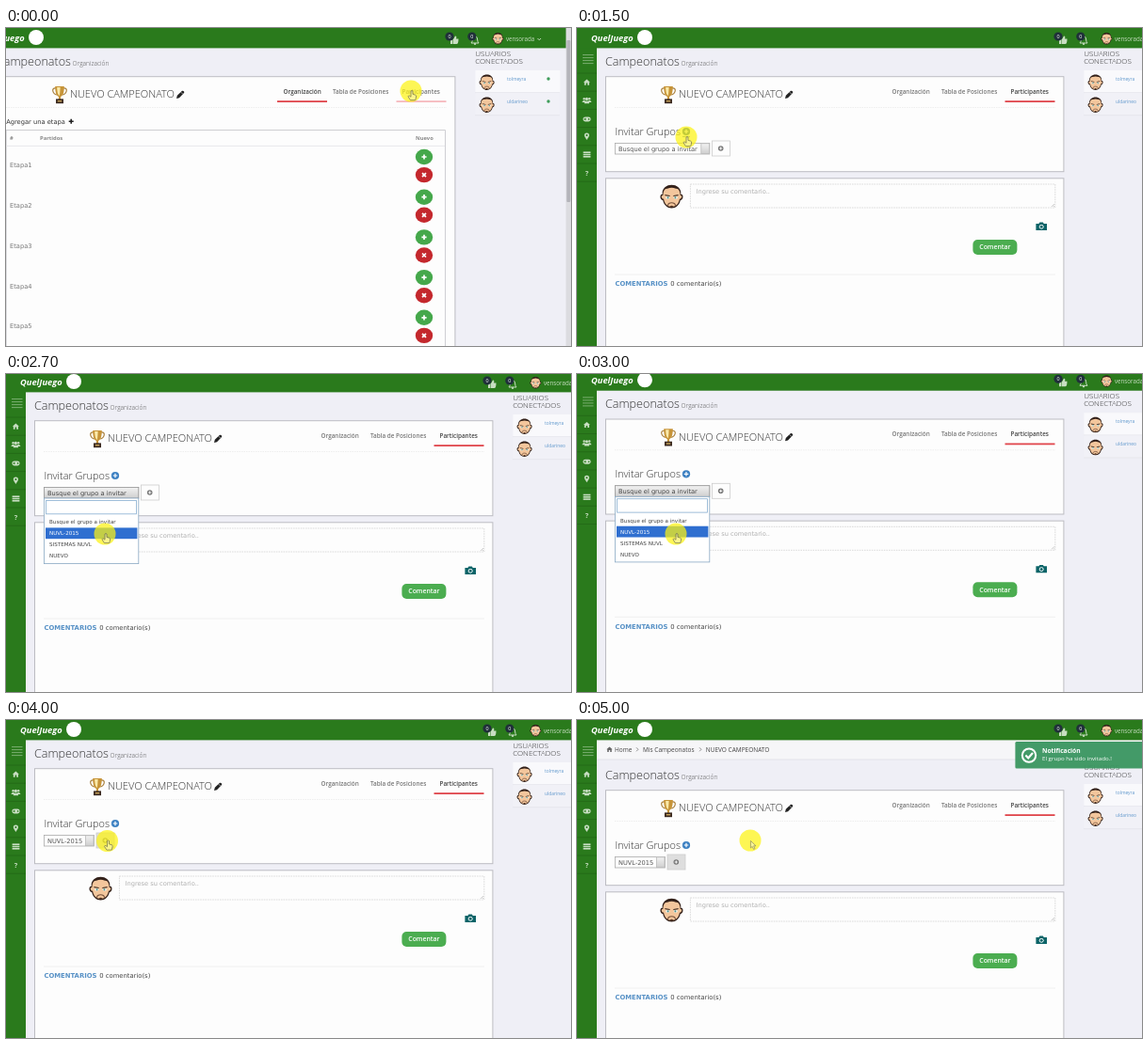
Write an HTML page that moves like this. It is 600x338 px and loops after 5100 ms.

```html
<!DOCTYPE html>
<html lang="es">
<head>
<meta charset="utf-8">
<title>Campeonatos</title>
<style>
html, body { margin: 0; width: 100%; height: 100%; overflow: hidden; background: #efeff6; }
svg { display: block; width: 100vw; height: 100vh; }
text { white-space: pre; }
.o { font-family: "Open Sans", sans-serif; }
.l { font-family: "Open Sans", sans-serif; font-weight: 300; }
.s { font-family: "Open Sans", sans-serif; font-weight: 600; }
.b { font-family: "Open Sans", sans-serif; font-weight: 700; }
.d { font-family: "DejaVu Sans", sans-serif; }
.db { font-family: "DejaVu Sans", sans-serif; font-weight: 700; }
</style>
</head>
<body>
<svg id="stage" viewBox="0 0 600 338" preserveAspectRatio="none"></svg>
<script>
const LOOP = 5100, STEP = 100;
const GREEN = '#2a7a1c', PALE = '#c8dec2';

// Markup helpers; text is placed by the vertical middle of its capitals.
const txt = (x, mid, size, cls, fill, s, extra = '') =>
  `<text x="${x}" y="${(mid + size * .36).toFixed(2)}" font-size="${size}" class="${cls}" fill="${fill}" ${extra}>${s}</text>`;
const rect = (x, y, w, h, fill, extra = '') =>
  `<rect x="${x}" y="${y}" width="${w}" height="${h}" fill="${fill}" ${extra}/>`;
const circle = (x, y, r, fill, extra = '') =>
  `<circle cx="${x}" cy="${y}" r="${r}" fill="${fill}" ${extra}/>`;
const oval = (x, y, rx, ry, fill) =>
  `<ellipse cx="${x}" cy="${y}" rx="${rx}" ry="${ry}" fill="${fill}"/>`;
const path = (d, fill, extra = '') => `<path d="${d}" fill="${fill}" ${extra}/>`;
const line = (d, color, w, extra = '') =>
  path(d, 'none', `stroke="${color}" stroke-width="${w}" ${extra}`);
const group = (id, body, extra = '') => `<g id="${id}" ${extra}>${body}</g>`;
const at = (x, y, body, k = 1) => `<g transform="translate(${x} ${y}) scale(${k})">${body}</g>`;
const border = c => `stroke="${c}" stroke-width=".8"`;
const panel = (y, h) => rect(30.5, y, 486.4, h, '#fdfdfd', 'stroke="#bcbcc2" stroke-width="1"');
const plus = (x, y, r, c, w) => line(`M${x - r} ${y}h${2 * r}M${x} ${y - r}v${2 * r}`, c, w);
const cross = (x, y, r, c, w) =>
  line(`M${x - r} ${y - r}l${2 * r} ${2 * r}M${x + r} ${y - r}l${-2 * r} ${2 * r}`, c, w);

// Face about 20 units wide
const face = (x, y, r) => at(x, y,
  path('M-8.6 -2C-9.6 -13.6 9.6 -13.6 8.6 -2C11.4 -2.6 11 3.4 8.2 3.6C7 8.4 4 11 0 11C-4 11 -7 8.4 -8.2 3.6C-11 3.4 -11.4 -2.6 -8.6 -2Z', '#33211a') +
  path('M-7.8 -3C-7.2 -6.4 -5.6 -7.4 -4 -7.2C-1.4 -8.4 1.4 -8.4 4 -7.2C5.6 -7.4 7.2 -6.4 7.8 -3L8 -.8C10.2 -1.4 9.6 2.4 7.4 2.4C6.4 7.6 3.6 9.6 0 9.6C-3.6 9.6 -6.4 7.6 -7.4 2.4C-9.6 2.4 -10.2 -1.4 -8 -.8Z', '#f3c69c') +
  path('M-6.4 -1.8L-1.6 -.9V.1L-6 -.7ZM6.4 -1.8L1.6 -.9V.1L6 -.7Z', '#3c2a20') +
  oval(-3.7, 1.2, 1.9, 1.1, '#f2f8f4') + oval(3.7, 1.2, 1.9, 1.1, '#f2f8f4') +
  circle(-3.4, 1.2, .9, '#4f8d84') + circle(3.4, 1.2, .9, '#4f8d84') +
  line('M-3.4 8.6C-4 5 4 5 3.4 8.6', '#75503a', 1) +
  path('M-1.6 9.8C-1.6 8 1.6 8 1.6 9.8Z', '#5a3a28'), r / 10.5);

const house = c => path('M0 -4L4.4 0H3.2V3.6H1V1H-1V3.6H-3.2V0H-4.4Z', c);
const person = (x, y, k) => at(x, y, circle(0, -2, 1.7, PALE) + path('M-3 3.4C-3 -.6 3 -.6 3 3.4Z', PALE), k);

const trophy = at(97, 71,
  line('M-4 -7C-9.6 -7.6 -7.4 -.6 -2.4 0M4 -7C9.6 -7.6 7.4 -.6 2.4 0', '#a9813f', 1.2) +
  path('M-4.8 -9H4.8C4.8 -2 3.4 1 1.1 2V5H-1.1V2C-3.4 1 -4.8 -2 -4.8 -9Z', '#c79438') +
  path('M-2.8 -8H.6C.4 -3 .2 -1 -.2 1C-2.2 0 -2.8 -4 -2.8 -8Z', '#fbe9a8') +
  rect(-4, 4.4, 8, 4.8, '#3b2a20') + rect(-2.2, 6, 4.4, 1.4, '#c9a45a'));

const pencil = at(225, 71, path('M-4 4L-3.2 .8L2 -4.2Q3 -4.6 4 -3.4Q4.6 -2.6 4 -2L-1 3.2Z', '#222') +
  line('M.8 -2.8L2.8 -.8', '#fff', .6));

const tab = (x, s, id) => txt(x, 67.5, 6.35, 's', '#777', s, id ? `id="${id}"` : '');

function row(i) {
  const y = 137 + i * 42.7;
  return txt(44, y + 9, 6.7, 'd', '#777', 'Etapa' + (i + 1)) +
    oval(484, y, 9.2, 8.2, '#45a84b') + plus(484, y, 2.6, '#fff', 1.7) +
    oval(484, y + 19.1, 9.2, 8.2, '#c4282d') + cross(484, y + 19.1, 2, '#fff', 1.7);
}

function addBox(x, id) {
  return rect(x, 120, 19, 16, '#fdfdfd', `id="${id}" ${border('#ccc')}`) +
    circle(x + 9.3, 128, 2.8, '#777') + plus(x + 9.3, 128, 1.6, '#fff', .9);
}

function select(w, s) {
  return rect(40.4, 122.4, w, 11.6, '#fdfdfd', border('#aaa')) +
    rect(40.4 + w - 9, 122.8, 8.6, 10.8, 'url(#grad)', border('#bbb')) +
    txt(44, 128.4, 6.65, 'd', '#555', s);
}

const groups = ['Busque el grupo a invitar', 'NUVL-2015', 'SISTEMAS NUVL', 'NUEVO'];
const menu = rect(40.4, 122.4, 100.4, 11.6, 'url(#grad)', border('#999')) +
  txt(44, 128.4, 6.65, 'd', '#444', groups[0]) +
  rect(40.4, 134, 100.4, 69.6, '#fff', border('#8aa9c4')) +
  rect(42.6, 136.4, 95.8, 14.4, '#fff', border('#86add0')) +
  rect(42, 0, 97.4, 11.8, '#2f6fd0', 'id="pick"') +
  groups.map((s, i) => txt(46, 159.2 + i * 12, 5.6, 'd', '#444', s, 'data-option')).join('');

const inviteTab =
  panel(51.7, 101) + panel(159.8, 260) +
  txt(40.4, 110, 10.9, 'l', '#333', 'Invitar Grupos') +
  circle(116, 110, 4.1, '#3c80c2', 'id="invite"') + plus(116, 110, 2.3, '#fff', 1.2) +
  line('M112 115.4H120', '#2a6496', .7, 'id="under"') +
  group('wide', select(100.4, groups[0]) + addBox(143.4, 'addWide')) +
  group('slim', select(53, groups[1]) + addBox(96, 'add')) +
  face(100.5, 179, 12) +
  rect(120.4, 166, 387.4, 25, '#fdfdfd', 'stroke="#ccc" stroke-width=".7" stroke-dasharray="1.6 1"') +
  line('M504 190L507 187M506 190L507 189', '#999', .5) +
  txt(126.5, 173.8, 6.65, 'd', '#b0b0b0', 'Ingrese su comentario..') +
  path('M487.4 208H490.4L491.4 206.6H494.8L495.8 208H499V215H487.4Z', '#0c6468') +
  circle(493.2, 211.3, 2.4, '#fff') + circle(493.2, 211.3, 1.5, '#0c6468') +
  rect(420.4, 225, 47, 16, '#4bad50', 'rx="5"') +
  txt(443.9, 233, 6.9, 's', '#fff', 'Comentar', 'text-anchor="middle"') +
  line('M40 262H508', '#ececec', .8) +
  txt(40.4, 271.8, 6.85, 'db', '#5791c6', 'COMENTARIOS') +
  txt(99.3, 271.8, 6.8, 'd', '#444', '0 comentario(s)');

const stagesTab =
  panel(51.7, 360) +
  txt(40.2, 99.3, 6.7, 'd', '#333', 'Agregar una etapa') + plus(109.2, 99.3, 2.5, '#222', 1.6) +
  rect(40.2, 108.6, 466.2, 300, '#fdfdfd', border('#c4c4c8')) +
  line('M40 125.4H506', '#e4e4e8', .8) +
  txt(44, 117.3, 5.8, 'b', '#888', '#') + txt(76, 117.3, 5.8, 'b', '#888', 'Partidos') +
  txt(475, 117.3, 5.8, 'b', '#888', 'Nuevo') +
  [0, 1, 2, 3, 4].map(row).join('');

const people = ['tolmeyra', 'uldarineo'].map((s, i) => {
  const y = 45 + i * 24;
  return rect(538.4, y, 90, 23.4, i ? '#f1f1f7' : '#f9f9fc') + line(`M538 ${y + 23.7}H628`, '#e2e2ea', .7) +
    face(550.6, y + 12.6, 8) + txt(572, y + 8.8, 4.9, 'o', '#5f97cc', s) + circle(616, y + 9, 1.7, '#3f9d5a');
}).join('');

const page =
  rect(0, -2, 640, 21, '#f6f6f8') + line('M21 19H640', '#dfdfe6', .8) +
  at(34.5, 8.3, house('#666'), .72) +
  txt(40, 8.3, 6.5, 'o', '#444', 'Home') + txt(70, 8.3, 6.5, 'o', '#444', 'Mis Campeonatos') +
  txt(136.8, 8.3, 6.5, 'o', '#444', 'NUEVO CAMPEONATO') +
  line('M63 6.3l2 2l-2 2M130 6.3l2 2l-2 2', '#777', .8) +
  txt(30, 35.2, 12.6, 'l', '#333', 'Campeonatos') + txt(110.6, 37.4, 6.6, 'l', '#555', 'Organización') +
  txt(538.2, 27, 8, 'l', '#333', 'USUARIOS') + txt(538.2, 35.2, 8, 'l', '#333', 'CONECTADOS') +
  people + group('invitePane', inviteTab) + group('stagesPane', stagesTab) +
  trophy + txt(108, 70.5, 11, 'l', '#333', 'NUEVO CAMPEONATO') + pencil +
  line('M40 84.5H508', '#e8e8e8', .7, 'stroke-dasharray="1.5 1"') +
  tab(334.5, 'Organización', 'tabOrg') + tab(387, 'Tabla de Posiciones') +
  tab(460.5, 'Participantes', 'tabPart') +
  rect(328, 77.2, 53, 1.8, '#e0464c', 'id="lineOrg"') + rect(454.5, 77.2, 53, 1.8, '#e0464c', 'id="linePart"') +
  group('menu', menu);

const badge = x => circle(x, 9, 4.6, '#20303a') + txt(x, 9, 5.4, 'o', '#fff', '0', 'text-anchor="middle"');
const header =
  rect(0, -6, 640, 27.4, GREEN) +
  txt(15, 10.4, 9.3, 'b', '#fff', 'QuelJuego', 'font-style="italic"') + circle(72, 10, 8, '#fff') +
  path('M512 12H514.5V17H512ZM515 12L517 8.5Q519 8.5 518 11.5H520.5Q520.5 17 518.5 17H515Z', PALE) +
  path('M534 16Q535.4 14.6 535.4 12Q535.4 9 538 8.6Q540.6 9 540.6 12Q540.6 14.6 542 16Z', 'none', `stroke="${PALE}"`) +
  circle(538, 17, 1.1, PALE) + badge(511) + badge(534.8) +
  face(562.4, 11.2, 6) + txt(571, 11.8, 6.2, 'o', PALE, 'vensorada') +
  line('M604.5 11l1.8 1.8l1.8 -1.8', PALE, 1);

const side =
  rect(0, 20, 21, 340, GREEN) +
  line('M6 28.6H17.5M6 31.6H17.5M6 34.6H17.5M6 37.6H17.5', '#8fbb86', .8) +
  line([0, 1, 2, 3, 4, 5, 6].map(i => `M0 ${48 + i * 19.2}H21`).join(''), '#226816', .8) +
  at(10.4, 57.8, house(PALE), .8) +
  person(7.6, 76.6, .7) + person(13.2, 76.6, .7) + person(10.4, 77.2, .9) +
  rect(6.4, 94.4, 8.2, 5, PALE, 'rx="2.4"') + plus(8.6, 96.9, 1.1, GREEN, .8) + circle(12.6, 96.9, .8, GREEN) +
  path('M10.4 119C8.4 116 7.8 115 7.8 114A2.6 2.6 0 0 1 13 114C13 115 12.4 116 10.4 119Z', PALE) + circle(10.4, 114, 1, GREEN) +
  [0, 1, 2].map(i => rect(6.6, 131.4 + i * 2.3, 7.8, 1.6, PALE)).join('') +
  txt(10.5, 154, 7.3, 'b', PALE, '?', 'text-anchor="middle"');

const notice =
  rect(465.4, 23, 140, 28.6, '#3a9660', 'rx="1.5" opacity=".95"') +
  circle(480, 37.6, 7.2, 'none', 'stroke="#fff" stroke-width="2"') +
  line('M476.4 37.6l2.8 2.9l4.8 -5.4', '#fff', 2.2) +
  txt(494, 32.2, 6.7, 'b', '#fff', 'Notificación') +
  txt(494, 41.2, 6.15, 'o', '#fff', 'El grupo ha sido invitado.!');

const bar = rect(634.6, 0, 6, 345, '#dcdce0') + rect(635.4, 13, 4, 172, '#b4b4ba', 'id="thumb" rx="1"');

const hand = path('M-1 -4Q0 -5 1 -4V-.6L3.8 .2Q4.8 .6 4.6 2L3.8 5.6H-1.6L-4 1.8Q-3.6 .4 -2.4 1.2L-1 2.2Z', '#fdf7a0', 'stroke="#555" stroke-width=".8" opacity=".75"');
const arrow = path('M0 0V7.6L1.8 6L3.2 9L4.6 8.3L3.2 5.4H5.6Z', '#fbf6b0', 'stroke="#666" stroke-width=".7" opacity=".75"');

document.getElementById('stage').innerHTML =
  `<defs><linearGradient id="grad" x2="0" y2="1"><stop stop-color="#f2f2f2"/><stop offset="1" stop-color="#cfcfcf"/></linearGradient></defs>` +
  rect(0, 0, 600, 338, '#efeff6') +
  group('cam', group('page', page) + side + header + group('notice', notice) + bar) +
  group('mouse', circle(0, 0, 11.5, '#fcf212', 'opacity=".72"') +
    group('hand', hand, 'transform="translate(1 4)"') + group('arrow', arrow, 'transform="translate(.4 .4)"'));

const $ = id => document.getElementById(id);
const options = document.querySelectorAll('[data-option]');
const show = (id, on) => $(id).setAttribute('display', on ? 'inline' : 'none');
const move = (id, x, y) => $(id).setAttribute('transform', `translate(${x.toFixed(2)} ${y.toFixed(2)})`);
const fill = (id, c) => $(id).setAttribute('fill', c);
const within = (t, a, b) => t >= a && t < b;

// Eased position on a track of [time, x, y] keys
function follow(keys, t) {
  let i = 0;
  while (i < keys.length - 2 && t > keys[i + 1][0]) i++;
  const [a, x0, y0] = keys[i], [b, x1, y1] = keys[i + 1];
  let k = Math.min(1, Math.max(0, (t - a) / (b - a)));
  k = k * k * (3 - 2 * k);
  return [x0 + (x1 - x0) * k, y0 + (y1 - y0) * k];
}

const camera = [[0, 40, 0], [600, 40, 0], [1200, 0, 0], [2200, 0, 0], [2700, 0, 2], [3100, 0, 4], [3600, 0, 4], [3900, 0, 0]];
const mouse = [[0, 430, 67], [200, 430, 67], [600, 248, 115], [1400, 116, 116], [1800, 116, 116], [2100, 128, 128],
  [2300, 128, 128], [2700, 105, 170], [3000, 105, 170], [3200, 107, 168], [3600, 107, 168], [3900, 107.5, 128.5],
  [4300, 107.5, 128.5], [5000, 184, 128]];
const scroll = [[4400, 0, 0], [4700, 0, 23]];
const fade = [[4400, 0, 0], [4700, 1, 0]];

function draw(t) {
  const [cx, cy] = follow(camera, t), [mx, my] = follow(mouse, t);
  move('cam', -cx, -cy);
  move('mouse', mx, my);
  move('page', 0, follow(scroll, t)[1]);

  const stages = t < 300;
  show('stagesPane', stages);
  show('invitePane', !stages);
  show('lineOrg', stages);
  fill('linePart', stages ? '#f6b9bd' : '#e0464c');
  fill('tabOrg', stages ? '#444' : '#777');
  fill('tabPart', stages ? '#777' : '#444');
  $('thumb').setAttribute('height', stages ? 172 : 241);

  const hot = within(t, 1300, 1900);
  fill('invite', hot ? '#2a6496' : '#3c80c2');
  show('under', hot);

  show('menu', within(t, 2200, 3100));
  const pick = my + cy > 165 ? 1 : 0;
  $('pick').setAttribute('y', 153.4 + pick * 12);
  options.forEach((o, i) => o.setAttribute('fill', i === pick ? '#fff' : '#444'));

  show('wide', t < 3100);
  show('slim', t >= 3100);
  fill('add', t >= 3900 ? '#dedede' : '#fdfdfd');

  $('notice').setAttribute('opacity', follow(fade, t)[0]);

  const pointing = stages || hot || within(t, 2400, 3100) || within(t, 3900, 4400);
  show('hand', pointing);
  show('arrow', !pointing && !within(t, 3100, 3700));
}

const start = performance.now();
function tick() {
  const t = (performance.now() - start) % LOOP;
  draw(Math.floor(t / STEP) * STEP);
  requestAnimationFrame(tick);
}
tick();
</script>
</body>
</html>
```
